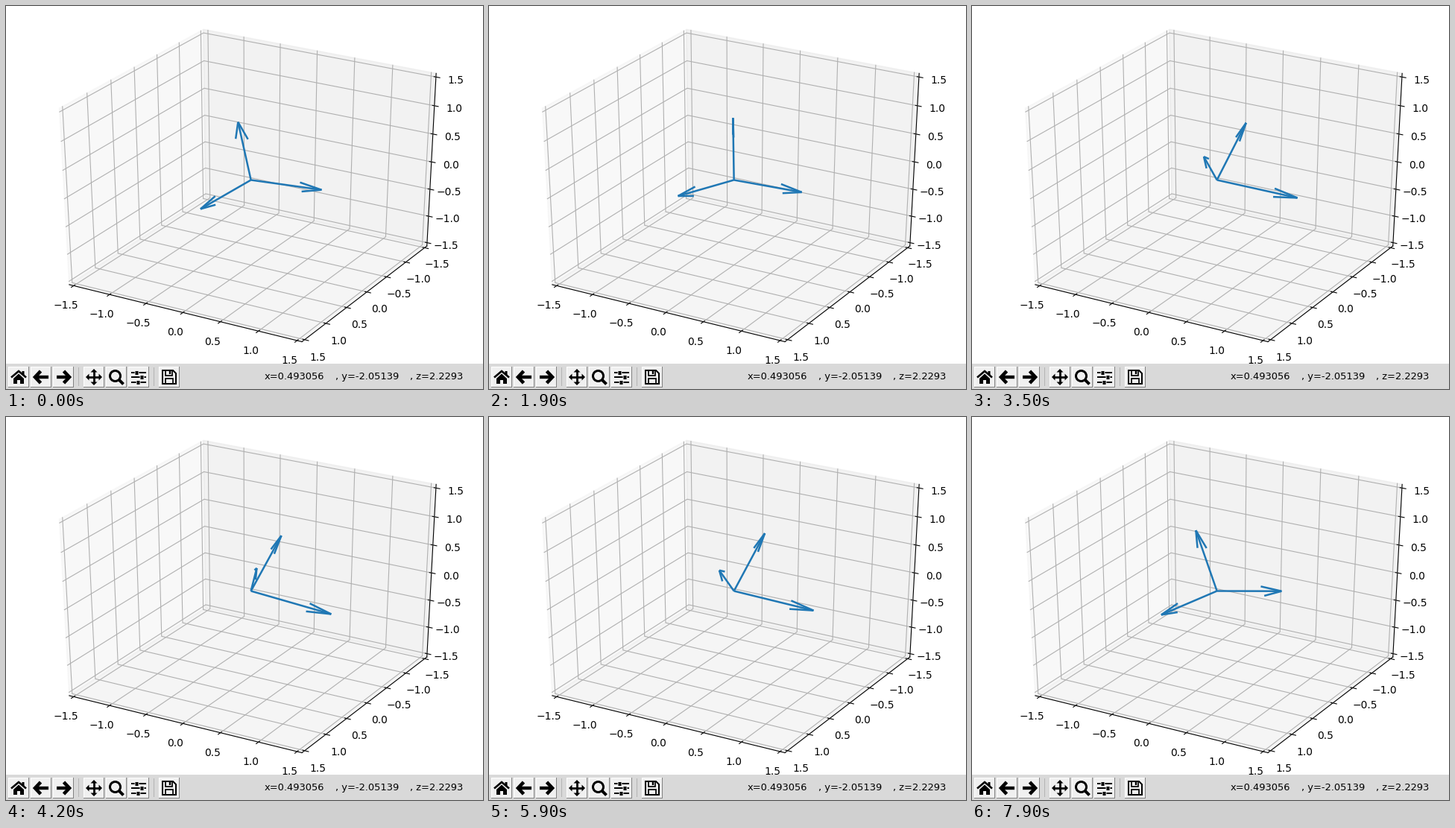
Write a matplotlib script that moves like this. It is 640x514 px and loops after 8000 ms.

```python
import matplotlib.pyplot as plt
import numpy as np
from matplotlib.animation import FuncAnimation
from matplotlib.collections import LineCollection
from matplotlib.patches import Circle, Polygon, Rectangle

W, H, PLOT_H = 640, 514, 480
PX = 0.72  # points per pixel at 100 dpi
DIST = 10
SX, SY = W / 0.185, PLOT_H / 0.185
CX, CY = 0.095 * SX, PLOT_H - 0.095 * SY
EDGE = 0.5 + 1 / 48  # half cube plus margin
FACE = "#f0f0f0"
BAR_Y = 498

# Camera rows: right, up, towards the viewer
az = el = np.radians(30)
CAM = np.array([
    [-np.sin(az), np.cos(az), 0],
    [-np.cos(az) * np.sin(el), -np.sin(az) * np.sin(el), np.cos(el)],
    [np.cos(az) * np.cos(el), np.sin(az) * np.cos(el), np.sin(el)],
])

fig = plt.figure(figsize=(W / 100, H / 100), dpi=100, facecolor="white")
ax = fig.add_axes([0, 0, 1, 1])
ax.set_xlim(0, W)
ax.set_ylim(H, 0)
ax.axis("off")


def project(p):
    q = np.asarray(p, float) @ CAM.T
    depth = DIST - q[..., 2]
    return np.stack([CX + SX * q[..., 0] / depth,
                     CY - SY * q[..., 1] / depth], axis=-1)


def line3d(points, color):
    ax.plot(*project(points).T, color=color, lw=0.8)


def point(base, k, value):
    p = np.array(base, float)
    p[k] = value
    return p


def draw_pane(k, gray):
    a, b = [i for i in range(3) if i != k]
    corners = np.full((4, 3), -EDGE)
    corners[1:3, a] = EDGE
    corners[2:4, b] = EDGE
    ax.add_patch(Polygon(project(corners), color=(gray,) * 3, alpha=0.5, lw=1))


def draw_axis(k, base, tick_dir):
    a, b = [i for i in range(3) if i != k]
    line3d([point(base, k, -EDGE), point(base, k, EDGE)], "black")
    ticks = np.linspace(-1.5, 1.5, 7)
    for v in ticks:
        path = np.full((3, 3), -EDGE)
        path[:, k] = v / 3
        path[0, a] = path[2, b] = EDGE
        line3d(path, "#b0b0b0")
    out = np.eye(3)[tick_dir] / 12
    for v in ticks:
        p = point(base, k, v / 3)
        line3d([p + 0.2 * out, p - 0.1 * out], "black")
        shift = point(np.sign(base) * 0.057, k, 0)
        x, y = project(p + shift)
        ax.text(x, y, f"{v:.1f}".replace("-", "\u2212"),
                ha="center", va="top", fontsize=10)


for k, gray in ((1, 0.95), (0, 0.90), (2, 0.925)):
    draw_pane(k, gray)
draw_axis(1, (EDGE, 0, -EDGE), 0)
draw_axis(0, (0, EDGE, -EDGE), 1)
draw_axis(2, (-EDGE, EDGE, 0), 1)


# Toolbar
def box(x, y, w, h, color, z=5):
    ax.add_patch(Rectangle((x, y), w, h, fc=color, ec="none", zorder=z))


def stroke(cx, pts, width, color="black"):
    x, y = np.transpose(pts)
    ax.plot(cx + x, BAR_Y + y, color=color, lw=width * PX, zorder=7,
            solid_capstyle="butt", solid_joinstyle="miter")


def fill(cx, pts):
    ax.add_patch(Polygon(np.add(pts, (cx, BAR_Y)), fc="black", ec="none", zorder=7))


def mirror(pts):
    return pts + [(-x, y) for x, y in reversed(pts)]


def home(c):
    stroke(c, mirror([(-10, 0.5), (0, -8)]), 2.6)
    fill(c, [(4.5, -8), (7.5, -8), (7.5, -1), (4.5, -4)])
    fill(c, mirror([(0, -4.5), (7, 2), (7, 9), (2, 9), (2, 4)]))


def arrow(c, s):
    stroke(c, [(s * 0.5, -8), (s * 8, 0), (s * 0.5, 8)], 4.6)
    stroke(c, [(-s * 9.5, 0), (s * 7, 0)], 4.4)


def move(c):
    for s in (-1, 1):
        for turn in (1, -1):
            stroke(c, [(0, 0), (s * 8, 0)][::1][:2] if turn > 0
                   else [(0, 0), (0, s * 8)], 2.8)
            head = [(s * 11, 0), (s * 6.5, -4.5), (s * 6.5, 4.5)]
            fill(c, [p[::turn] for p in head])


def zoom(c):
    ax.add_patch(Circle((c - 1.5, BAR_Y - 1.5), 7, fc="none", ec="black",
                        lw=3 * PX, zorder=7))
    stroke(c, [(3, 3), (9.5, 9.5)], 4)


def sliders(c):
    for y, knob in ((-6.5, -3), (0, 4), (6.5, -1)):
        stroke(c, [(-10, y), (10, y)], 2)
        stroke(c, [(knob - 3, y), (knob + 3, y)], 5, FACE)
        stroke(c, [(knob - 2, y), (knob + 2, y)], 5)


def save(c):
    stroke(c, [(0, -9), (5, -9), (9, -5), (9, 9), (-9, 9), (-9, -9), (0, -9)], 2)
    stroke(c, mirror([(-5, 9), (-5, 2)]), 1.7)
    stroke(c, [(-5, -9), (-5, -2.5), (4, -2.5), (4, -9)], 1.7)
    stroke(c, [(1, -9), (1, -4)], 2.4)


def button(cx, icon, *args):
    box(cx - 14, 484, 28, 28, "#828282")
    box(cx - 14, 484, 27, 27, "white")
    box(cx - 13, 485, 26, 26, FACE)
    icon(cx, *args)


box(0, PLOT_H, W, H - PLOT_H, "#d9d9d9", z=4)
button(17, home)
button(47, arrow, -1)
button(77, arrow, 1)
button(118, move)
button(148, zoom)
button(178, sliders)
button(219, save)
for x in (97, 198):
    box(x, 485, 1, 25, "#b4b4b4")
for x, label in ((346.5, "x=0.493056"), (441.5, ", y=-2.05139"),
                 (541.5, ", z=2.2293")):
    ax.text(x, 501, label, fontsize=13 * PX, va="baseline", zorder=7)

# Key orientations: seconds, then yaw, pitch and roll in degrees
KEYS = np.array([
    (0.0, -5, 2, 9),
    (0.8, -5.6, 2.3, 6.3),
    (1.9, -10, -9, 8.3),
    (2.7, -1, -27, 4),
    (3.5, 16.7, -50, -10),
    (4.9, 55, -50, -41),
    (6.1, 8, -47, -5),
    (6.8, -5.4, -26.5, 6.3),
    (7.9, -9.3, -1.7, 19.7),
])


def turn(axis, degrees):
    """Rotation matrix about one coordinate axis."""
    c, s = np.cos(np.radians(degrees)), np.sin(np.radians(degrees))
    i, j = (axis + 1) % 3, (axis + 2) % 3
    m = np.eye(3)
    m[i, i] = m[j, j] = c
    m[i, j], m[j, i] = -s, s
    return m


def arrow_lines(v):
    """Shaft and two head strokes, turned 15 degrees in the vertical plane."""
    axis = np.array([v[1], -v[0], 0]) / max(np.hypot(v[0], v[1]), 1e-9)
    side = np.cross(axis, v)
    c, s = np.cos(np.radians(15)), np.sin(np.radians(15))
    lines = [(np.zeros(3), v)]
    lines += [(v, v - 0.3 * (c * v + sign * s * side)) for sign in (1, -1)]
    return [project(np.array(seg) / 3) for seg in lines]


arrows = LineCollection([], colors="#1f77b4", linewidths=1.8, zorder=3)
ax.add_collection(arrows, autolim=False)


def update(n):
    yaw, pitch, roll = (np.interp(n / 10, KEYS[:, 0], col) for col in KEYS[:, 1:].T)
    pose = turn(2, yaw) @ turn(1, pitch) @ turn(0, roll)
    arrows.set_segments([seg for v in pose.T for seg in arrow_lines(v)])
    return (arrows,)


anim = FuncAnimation(fig, update, frames=80, interval=100, repeat=True,
                     repeat_delay=0, cache_frame_data=False)
plt.show()
```
